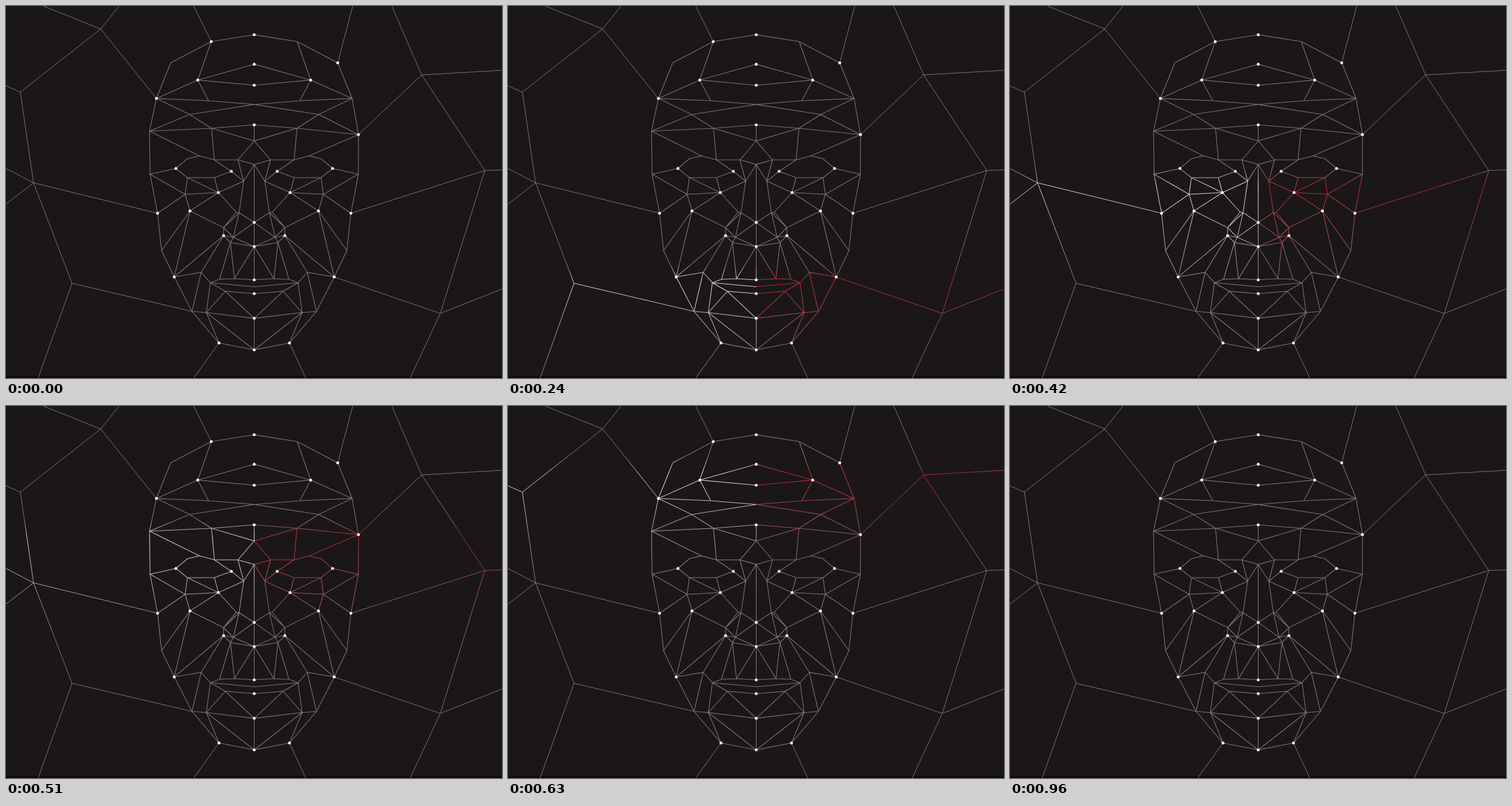
An HTML page with a canvas for the animation above (2280 ms loop, 864 px wide and 648 px high).

```html
<!DOCTYPE html>
<html lang="en">
<head>
<meta charset="utf-8">
<title>Face mesh scan</title>
<style>
  html, body { margin: 0; width: 100%; height: 100%; overflow: hidden; background: #1b1718; }
  canvas { display: block; }
</style>
</head>
<body>
<canvas id="stage" width="864" height="648"></canvas>
<script>
const W = 864, H = 648, MID = 432.4;
const LOOP = 2280, STEP = 30, SCAN_START = 60, SCAN_END = 960;
const SPEED = 0.93, TRAIL = 260, RISE = 0.12;
const GREY = [124, 121, 122], WHITE = [226, 225, 225], RED = [196, 38, 46];
const ctx = document.getElementById('stage').getContext('2d');

// Key points by group; the face groups hold the left half only.
const points = {
  m: [50, 101.5, 138, 171.5, 207, 235, 276, 377, 419, 477, 489, 501, 544, 599].map(y => [MID, y]),
  r: [[357.5, 62], [287, 99], [262, 161], [250, 218], [251, 293],
      [264, 361], [271, 426], [293, 472], [324, 532], [371, 587]],
  f: [[334, 129], [353, 165], [320, 189], [358, 213], [363, 268], [404, 268]],
  e: [[414, 305], [337, 261], [316, 266], [296, 283], [392.5, 288],
      [316, 299], [363, 299], [312, 328], [370, 325], [320.5, 357]],
  n: [[401, 359], [406, 360], [379, 386], [396, 403], [379, 400], [391, 412]],
  l: [[372, 476], [398, 475], [340, 464], [356, 482], [349, 534], [382, 497]],
  b: [[165, 40], [25, 150], [48, 308], [115, 483], [724, 120], [834, 286.5], [756.5, 535.5]],
  x: [[65, 0], [197, 0], [0, 139], [0, 283], [0, 345], [56, H], [327, 0], [327, H],
      [604, 0], [672, 0], [W, 112], [W, 285.5], [W, 493], [704, H], [522, H]]
};
const rightTemple = [614, 224];

// Chains of point names. Upper case means the mirrored point.
const face = [
  'm0 r0 r1 r2 r3 r4 r5 r6 r7 r8 r9 m13',
  'r0 f0 m1', 'm2 f0 f1', 'f0 r2 f1 m3 f2 r2', 'r3 f2 f3', 'r3 f3 m4', 'm5 f3 f4',
  'm5 f5 f4', 'e0 f5 m6 e0', 'r3 e1 e2 e3 r4 e7 r5', 'e1 f4 e4 e0 e8 e7 e9 e8 n0',
  'e3 e5 e6 e4', 'e7 e5 e8 e6',
  'e0 n1 n0 n2 n1 m7 n3 n1', 'r6 e9 r7 n4 n2 e9', 'n2 n3 n4 n5 n3 m8', 'l2 n4', 'l0 n5 l1 m8 n5',
  'r7 l2 r8 l4 r9', 'l2 l3 l4 l5 l3 l0 l1 m9', 'l3 m10', 'm11 l5 m12 l4 m13'
];
const axis = ['m4 m5', 'm6 m9', 'm12 m13'];
const background = [
  'x0 b0 x1', 'x2 b1 b0 r2', 'b1 b2 x3', 'x4 b2 r5', 'b2 b3 x5', 'b3 r8', 'x6 r0', 'r9 x7',
  'x8 R1', 'x9 b4 x10', 'R3 b4 b5 x11', 'R5 b5 b6 x12', 'R7 b6 x13', 'R9 x14'
];
const pairedDots = 'f0 e3 e4 e8 e9 r5 n4 r7 r9';
const singleDots = 'r0 r2 R1 R3 m0 m1 m2 m4 m7 m8 m9 m11 m12 m13';

function locate(name) {
  if (name === 'R3') return rightTemple;
  const group = name[0].toLowerCase();
  const [x, y] = points[group][name.slice(1)];
  return name[0] === group ? [x, y] : [2 * MID - x, y];
}

function trace(chains) {
  const path = new Path2D();
  for (const chain of chains) {
    chain.split(' ').forEach((name, i) => path[i ? 'lineTo' : 'moveTo'](...locate(name)));
  }
  return path;
}

const mirrored = chain => chain.toUpperCase();
const facePath = trace([...face, ...face.map(mirrored), ...axis]);
const backPath = trace(background);
const dotPath = new Path2D();
for (const name of [pairedDots, mirrored(pairedDots), singleDots].join(' ').split(' ')) {
  const [x, y] = locate(name);
  dotPath.moveTo(x + 2.5, y);
  dotPath.arc(x, y, 2.5, 0, Math.PI * 2);
}

// Glow strength below the front: a short rise, then a long fade.
const glow = u => u < RISE ? u / RISE : ((1 - u) / (1 - RISE)) ** 1.7;

function sweep(front, color) {
  const g = ctx.createLinearGradient(0, front, 0, front + TRAIL);
  for (let u = 0; u <= 1; u += RISE / 3) {
    const k = glow(u);
    g.addColorStop(u, `rgb(${GREY.map((v, i) => Math.round(v + (color[i] - v) * k))})`);
  }
  return g;
}

function drawSide(x, width, style) {
  ctx.save();
  ctx.beginPath();
  ctx.rect(x, 0, width, H);
  ctx.clip();
  ctx.strokeStyle = style;
  ctx.lineWidth = 1;
  ctx.stroke(backPath);
  ctx.lineWidth = 1.1;
  ctx.stroke(facePath);
  ctx.restore();
}

function draw(time) {
  const t = Math.min(Math.floor(time / STEP) * STEP, SCAN_END);
  const front = t < SCAN_START ? H : 617 - SPEED * (t - SCAN_START);
  const split = Math.ceil(MID);
  ctx.fillStyle = '#1b1718';
  ctx.fillRect(0, 0, W, H);
  ctx.fillStyle = '#10060b';
  ctx.fillRect(0, H - 3, W, 3);
  drawSide(0, split, sweep(front, WHITE));
  drawSide(split, W - split, sweep(front, RED));
  ctx.fillStyle = '#fff';
  ctx.fill(dotPath);
}

const start = performance.now();
function tick() {
  draw((performance.now() - start) % LOOP);
  requestAnimationFrame(tick);
}
tick();
</script>
</body>
</html>
```
